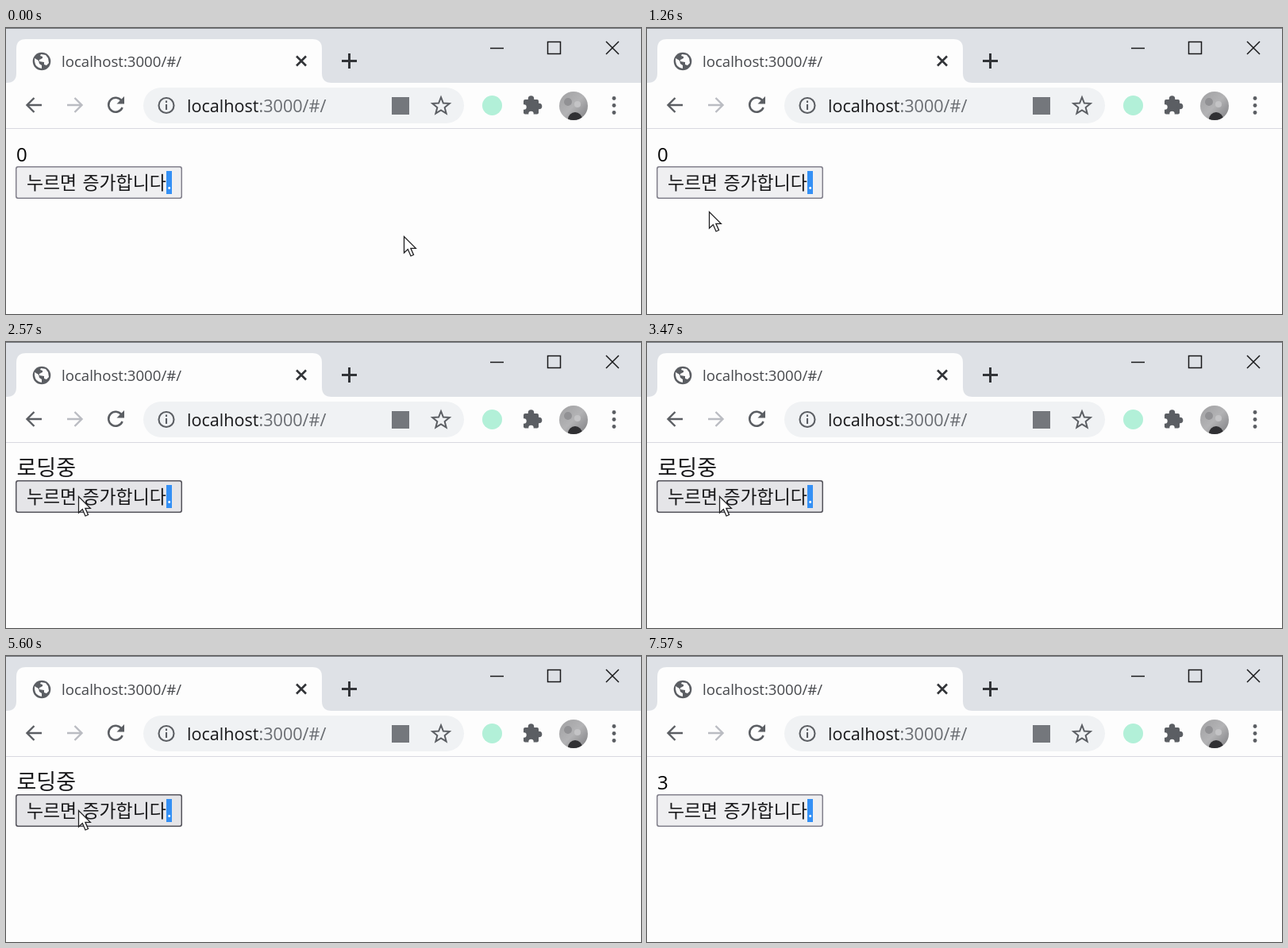
Recreate the animation shown at these times as an HTML page with a canvas. Size 800x360 px, loop 7600 ms.

```html
<!DOCTYPE html>
<html lang="ko">
<head>
<meta charset="utf-8">
<title>Counter</title>
<style>
html, body { margin: 0; width: 100%; height: 100%; overflow: hidden; background: #fdfdfd; }
canvas { display: block; width: 800px; height: 360px; }
</style>
</head>
<body>
<canvas id="stage" width="800" height="360"></canvas>
<script>
const ctx = document.getElementById('stage').getContext('2d');
const LOOP = 7600, LOAD = 1030, PRESS = 90;
const CLICKS = [1950, 3430, 4900];
const PAGE = '#fdfdfd', BAR = '#dee1e6', FIELD = '#f0f2f4', ICON = '#5b5e63', INK = '#18181a';
const LATIN = '"Open Sans", "Noto Sans", sans-serif';
const HANGUL = '"Noto Sans CJK KR", "Noto Sans CJK", sans-serif';

// time, x, y of the pointer tip
const PATH = [
  [0, 501, 262], [300, 501, 262], [1120, 78, 231], [1500, 78, 231],
  [1720, 91, 194], [6780, 91, 194], [7000, 118, 275]
];

function text(str, x, y, size, color, family = LATIN) {
  const weight = family === HANGUL ? 300 : 400;
  ctx.font = `${weight} ${size}px ${family}`;
  ctx.fillStyle = color;
  ctx.fillText(str, x, y);
}

function box(x, y, w, h, color) {
  ctx.fillStyle = color;
  ctx.fillRect(x, y, w, h);
}

function round(x, y, w, h, r, color) {
  ctx.beginPath();
  ctx.roundRect(x, y, w, h, r);
  ctx.fillStyle = color;
  ctx.fill();
}

function disc(x, y, r, color) {
  ctx.beginPath();
  ctx.arc(x, y, r, 0, Math.PI * 2);
  ctx.fillStyle = color;
  ctx.fill();
}

function stroke(d, color, width) {
  ctx.strokeStyle = color;
  ctx.lineWidth = width;
  ctx.stroke(new Path2D(d));
}

function fill(d, color) {
  ctx.fillStyle = color;
  ctx.fill(new Path2D(d));
}

function titleBar() {
  box(0, 0, 800, 69, BAR);
  box(0, 0, 800, 1, '#74777c');
  fill('M1 69Q13 69 13 57V26Q13 14 25 14H386Q398 14 398 26V57Q398 69 410 69Z', PAGE);

  disc(45, 42, 11.3, ICON);
  fill('M36 38L41 41L42 45L45 47V51Q37 50 36 42Z', PAGE);
  fill('M44 33L50 34L53 38L54 44L51 47L48 46V43L42 42V40L46 38V36L43 35Z', PAGE);

  text('localhost:3000/#/', 70, 48.5, 18.6, '#45474b');
  stroke('M366 35.5L378 47.5M378 35.5L366 47.5', '#323438', 2.6);
  stroke('M423 41.5H442M432.5 32V51', '#323438', 3);
  stroke('M610 25.5H627M682.5 17.5H698.5V32.5H682.5Z', '#18181a', 1.5);
  stroke('M756 17L772 33M772 17L756 33', '#18181a', 1.5);
}

function avatar(x, y, r) {
  ctx.save();
  ctx.beginPath();
  ctx.arc(x, y, r, 0, Math.PI * 2);
  ctx.clip();
  const g = ctx.createLinearGradient(x - r, y - r, x + r, y + r);
  g.addColorStop(0, '#a0a0a2');
  g.addColorStop(0.5, '#b3b3b5');
  g.addColorStop(1, '#7e7e81');
  ctx.fillStyle = g;
  ctx.fillRect(x - r, y - r, 2 * r, 2 * r);
  disc(x - 7, y - 5, 5, '#919194');
  disc(x + 5, y - 2, 4, '#c4c4c6');
  disc(x + 2, y + 17, 9, '#303033');
  ctx.restore();
}

function toolBar() {
  box(0, 126, 800, 1, '#d9d9e0');
  stroke('M45 97H27M35.5 88L26.5 97L35.5 106', ICON, 2.4);
  stroke('M77 97H95M86.5 88L95.5 97L86.5 106', '#babcc2', 2.4);
  stroke('M145.5 91.5A9 9 0 1 0 146.6 100', ICON, 2.5);
  fill('M149 86V95.5H139.5Z', ICON);

  round(173, 75, 404, 45, 22.5, FIELD);
  stroke('M192.5 97.5A9.5 9.5 0 1 1 211.5 97.5A9.5 9.5 0 1 1 192.5 97.5M202 96V103M202 91.5V94', ICON, 2.1);
  const size = 21.6;
  text('localhost', 228, 106, size, INK);
  text(':3000/#/', 228 + ctx.measureText('localhost').width, 106, size, '#696c71');

  box(486, 87, 22, 22, '#74777c');
  ctx.beginPath();
  for (let i = 0; i < 10; i++) {
    const a = -Math.PI / 2 + i * Math.PI / 5, r = i % 2 ? 4.9 : 11.3;
    ctx.lineTo(548 + r * Math.cos(a), 98.5 + r * Math.sin(a));
  }
  ctx.closePath();
  ctx.strokeStyle = ICON;
  ctx.lineWidth = 2;
  ctx.stroke();

  disc(612.5, 97.5, 12.5, '#b2f0d8');
  round(652, 90, 19, 18.5, 2, ICON);
  disc(661.5, 89, 3.8, ICON);
  disc(671.5, 98.5, 3.8, ICON);
  disc(652.5, 99.5, 3.2, PAGE);
  disc(661.5, 108, 3.2, PAGE);
  avatar(715, 98, 18);
  for (const y of [88.5, 97.5, 106.5]) disc(766, y, 2.4, ICON);
}

function pointer(t) {
  const i = PATH.findIndex(p => p[0] > t);
  if (i < 0) return null;
  const [t0, x0, y0] = PATH[i - 1], [t1, x1, y1] = PATH[i];
  const u = (t - t0) / (t1 - t0);
  const leaving = i === PATH.length - 1;
  const e = leaving ? u * u : u * u * (3 - 2 * u);
  return { x: x0 + (x1 - x0) * e, y: y0 + (y1 - y0) * e };
}

function counter(t) {
  const loading = CLICKS.some(c => t >= c && t < c + LOAD);
  if (loading) text('로딩중', 13.5, 167.5, 27, INK, HANGUL);
  else text(String(CLICKS.filter(c => t >= c + LOAD).length), 13, 168, 24, '#000');
}

function button(hover, pressed) {
  const dark = hover && !pressed;
  round(12, 174, 210, 41, 3, dark ? '#55545c' : '#82808c');
  round(13.5, 175.5, 207, 38, 2, dark ? '#e5e5e8' : '#efeff1');
  text('누르면', 26, 203, 22.9, INK, HANGUL);
  text('증가합니다', 96.5, 203, 22.9, INK, HANGUL);
  box(202, 180, 7, 29, '#3490f5');
  text('.', 202.5, 203, 22.9, '#fff', HANGUL);
}

function arrow({ x, y }) {
  ctx.save();
  ctx.translate(Math.round(x) + 0.5, Math.round(y) + 0.5);
  ctx.lineJoin = 'miter';
  const d = 'M0 0V20.5L4.8 16L8.5 24.5L12 23L8.4 14.8H14.8Z';
  fill(d, '#fff');
  stroke(d, '#202022', 1.3);
  ctx.restore();
}

function draw(t) {
  box(0, 0, 800, 360, PAGE);
  titleBar();
  toolBar();
  counter(t);
  const p = pointer(t);
  const hover = p && p.x > 12 && p.x < 222 && p.y > 174 && p.y < 215;
  button(hover, CLICKS.some(c => t >= c - PRESS && t < c));
  if (p) arrow(p);
}

const start = performance.now();
function tick() {
  draw((performance.now() - start) % LOOP);
  requestAnimationFrame(tick);
}
tick();
</script>
</body>
</html>
```
